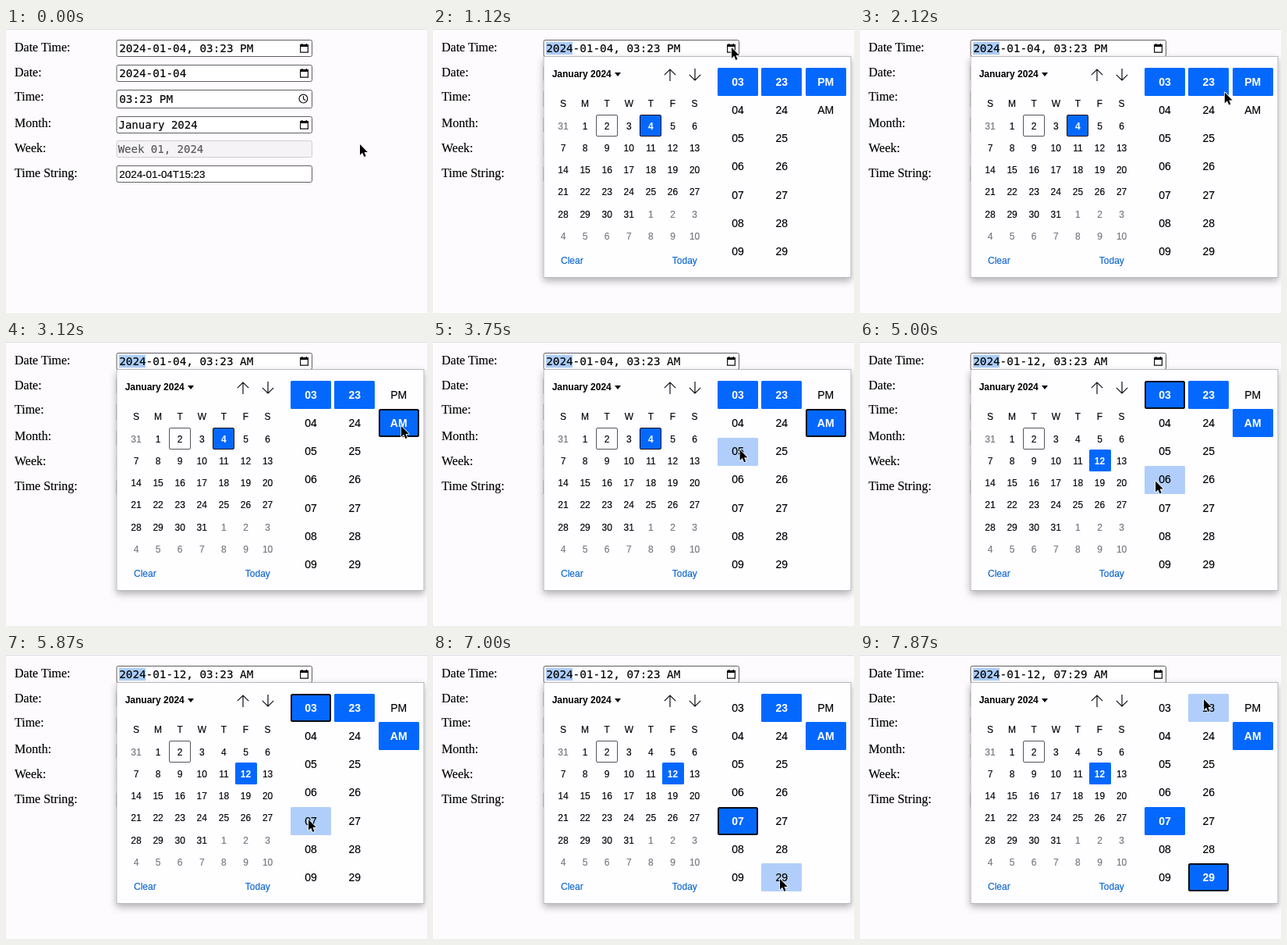
These frames come from a looping animation (540 by 365 pixels, 8000 ms). An HTML page:

```html
<!DOCTYPE html>
<html lang="en">
<head>
<meta charset="utf-8">
<title>Date time picker</title>
<style>
  html, body { margin: 0; width: 100%; height: 100%; overflow: hidden; background: #fdfbfe; }
  svg { display: block; width: 540px; height: 365px; }
  text { stroke: currentColor; stroke-width: .15px; }
  .label { font: 16px "Liberation Serif", serif; }
  .wide { font: 14.3px "DejaVu Sans Mono", monospace; white-space: pre; }
  .mono { font: 14px "DejaVu Sans Mono", monospace; white-space: pre; }
  .plain { font: 13.4px "Liberation Sans", sans-serif; }
  .day { font: 12px "Liberation Sans", sans-serif; }
  .slot { font: 14px "Liberation Sans", sans-serif; }
  .mid { text-anchor: middle; }
  .bold { font-weight: bold; stroke: none; }
</style>
</head>
<body>
<svg id="stage" viewBox="0 0 540 365">
  <defs>
    <filter id="shade" x="-8%" y="-8%" width="116%" height="120%">
      <feDropShadow dx="0" dy="4" stdDeviation="5" flood-color="#000" flood-opacity=".3"/>
    </filter>
  </defs>
  <rect y="1" width="540" height="1" fill="#d9d7db"/>
  <g id="form"></g>
  <g id="popup">
    <rect x="142" y="36.5" width="394" height="283" fill="#fefdff" stroke="#b9b8bc" filter="url(#shade)"/>
    <text class="day bold" x="152.7" y="63">January 2024</text>
    <path d="M233 57h8l-4 5z"/>
    <path d="M304 68V53M296.8 60.2l7.2-7.2 7.2 7.2M336 52v15M328.8 59.8l7.2 7.2 7.2-7.2"
      fill="none" stroke="#111" stroke-width="1.2"/>
    <g fill="#0b66cf" color="#0b66cf">
      <text class="day" x="164" y="302">Clear</text>
      <text class="day" x="306.8" y="302">Today</text>
    </g>
    <g id="cells"></g>
  </g>
  <path id="cursor" d="M0 0V13.8L3.2 10.8 5.4 16 7.6 15.1 5.5 10H9.8Z"
    fill="#000" stroke="#fff" stroke-width="1.6" paint-order="stroke" stroke-linejoin="round"/>
</svg>
<script>
const LOOP = 8000, STEP = 125;
const BLUE = '#0468ff', PALE = '#b1cefb', INK = '#0d0d14';
const byId = id => document.getElementById(id);

function add(parent, tag, attrs, text) {
  const el = document.createElementNS('http://www.w3.org/2000/svg', tag);
  set(el, attrs);
  if (text !== undefined) el.textContent = text;
  return parent.appendChild(el);
}
function set(el, attrs) {
  for (const k in attrs) el.setAttribute(k, attrs[k]);
}

// label, label baseline, box top, box height, value, value x, class
const rows = [
  ['Date Time:', 30, 15, 21, '', 145.2, 'wide'],
  ['Date:', 62, 47, 21, '2024-01-04', 145.2, 'wide'],
  ['Time:', 93, 79, 23, '03:23 PM', 145.2, 'wide'],
  ['Month:', 127, 113, 21, 'January 2024', 144.5, 'mono'],
  ['Week:', 159, 144.5, 21, 'Week 01, 2024', 143.7, 'mono'],
  ['Time String:', 191, 176.5, 21, '2024-01-04T15:23', 145.3, 'plain']
];
const form = byId('form');
let yearMark;
const values = rows.map(([name, base, top, h, value, x, cls], i) => {
  const off = i === 4, ink = off ? '#58575a' : '#000';
  add(form, 'text', { class: 'label', x: 11, y: base }, name);
  add(form, 'rect', {
    x: 142, y: Math.floor(top) + .5, width: 250.5, height: h, rx: 2,
    fill: off ? '#f5f3f6' : '#fff', stroke: off ? '#cfcdd1' : '#5f5e63'
  });
  if (!i) yearMark = add(form, 'rect', { x: 145, y: 18, width: 34, height: 16, fill: '#accdfa' });
  if (i === 2) {
    add(form, 'path', {
      d: 'M381.5 87v4l2.8 1.8M386.8 90.6a5.4 5.4 0 1 1-10.8 0 5.4 5.4 0 1 1 10.8 0',
      fill: 'none', stroke: '#111', 'stroke-width': 1.2
    });
  } else if (i < 4) {
    const y = top + 5;
    add(form, 'path', { d: `M377.6 ${y + 1.6}h9.8v9.6h-9.8z`, fill: 'none', stroke: '#111', 'stroke-width': 1.2 });
    add(form, 'path', { d: `M377 ${y + 1}h11v3h-11zM379 ${y}h1.4v2h-1.4zM384.6 ${y}h1.4v2h-1.4z` });
  }
  return add(form, 'text', { class: cls, x, y: top + h / 2 + 5, fill: ink, color: ink }, value);
});

const cellLayer = byId('cells'), cells = [];
function cell(key, text, left, top, w, h, cls, ink, edge) {
  const rect = add(cellLayer, 'rect', { rx: 1.5 });
  const label = add(cellLayer, 'text', {
    x: left + w / 2, y: top + h / 2 + 4.7
  }, text);
  const x = Math.round(left), y = Math.round(top);
  cells.push({ key, x, y, w, h, cls: cls + ' mid', ink, edge, rect, label });
}
const two = n => String(n).padStart(2, '0');

[...'SMTWTFS'].forEach((c, i) =>
  add(cellLayer, 'text', { class: 'day mid', x: 167 + 28.1 * i, y: 101 }, c));
for (let i = 0; i < 42; i++) {
  const day = (i + 30) % 31 + 1, inside = i > 0 && i < 32;
  cell((inside ? 'd' : 'x') + day, day, 153 + 28.1 * (i % 7), 111 + 28.25 * Math.floor(i / 7),
    28, 28, 'day', inside ? '#000' : '#77767a', i === 2);
}
const slot = (key, text, x, i) =>
  cell(key, text, x, 51.2 + 36.17 * i, 52, 36, 'slot', '#000');
for (let i = 0; i < 7; i++) {
  slot('h' + (3 + i), two(3 + i), 365, i);
  slot('m' + (23 + i), 23 + i, 421.3, i);
}
['PM', 'AM'].forEach((p, i) => slot(p, p, 477.7, i));

// start, end, x, y of each pointer move
const moves = [
  [0, 625, 383, 25],
  [1500, 2500, 507, 109],
  [3250, 4125, 320, 159],
  [4500, 5125, 386, 182],
  [5125, 5250, 389, 185],
  [5375, 5875, 388, 212],
  [6250, 7000, 445, 288],
  [7375, 7875, 441, 58]
];
const ease = p => p * p * (3 - 2 * p);

function pointer(t) {
  let x = 454, y = 149;
  for (const [a, b, tx, ty] of moves) {
    const p = ease(Math.min(1, Math.max(0, (t - a) / (b - a))));
    x += (tx - x) * p;
    y += (ty - y) * p;
  }
  return [x, y];
}

function focusAt(t) {
  if (t >= 7250) return 'm29';
  if (t >= 6125) return 'h7';
  if (t >= 4500) return 'h3';
  if (t >= 4375) return 'd12';
  return t >= 2625 ? 'AM' : '';
}

function draw(t) {
  const [px, py] = pointer(t);
  const day = t < 4500 ? 4 : 12, hour = t < 6125 ? 3 : 7;
  const min = t < 7250 ? 23 : 29, half = t < 2625 ? 'PM' : 'AM';
  const chosen = ['d' + day, 'h' + hour, 'm' + min, half];
  const rings = [focusAt(t), 'd4'];

  values[0].textContent = `2024-01-${two(day)}, ${two(hour)}:${min} ${half}`;
  yearMark.style.display = t >= 625 ? '' : 'none';
  byId('popup').style.display = t >= 1000 ? '' : 'none';

  for (const c of cells) {
    const on = chosen.includes(c.key);
    const ring = rings.includes(c.key) && (on || c.key !== 'd4');
    const over = px >= c.x && px < c.x + c.w && py >= c.y && py < c.y + c.h;
    const line = ring ? (c.cls[0] === 'd' ? 1 : 2) : c.edge ? 1 : 0;
    const ink = on ? '#fff' : c.ink;
    set(c.rect, {
      x: c.x + line / 2, y: c.y + line / 2, width: c.w - line, height: c.h - line,
      fill: on ? BLUE : over ? PALE : 'none',
      stroke: ring ? INK : line ? '#555459' : 'none', 'stroke-width': line
    });
    set(c.label, { fill: ink, color: ink, class: c.cls + (on ? ' bold' : '') });
  }
  set(byId('cursor'), { transform: `translate(${px.toFixed(1)} ${py.toFixed(1)})` });
}

// The picture advances eight times a second.
const start = performance.now();
function tick() {
  const t = (performance.now() - start) % LOOP;
  draw(Math.floor((t + 5) / STEP) * STEP % LOOP);
  requestAnimationFrame(tick);
}
tick();
</script>
</body>
</html>
```
